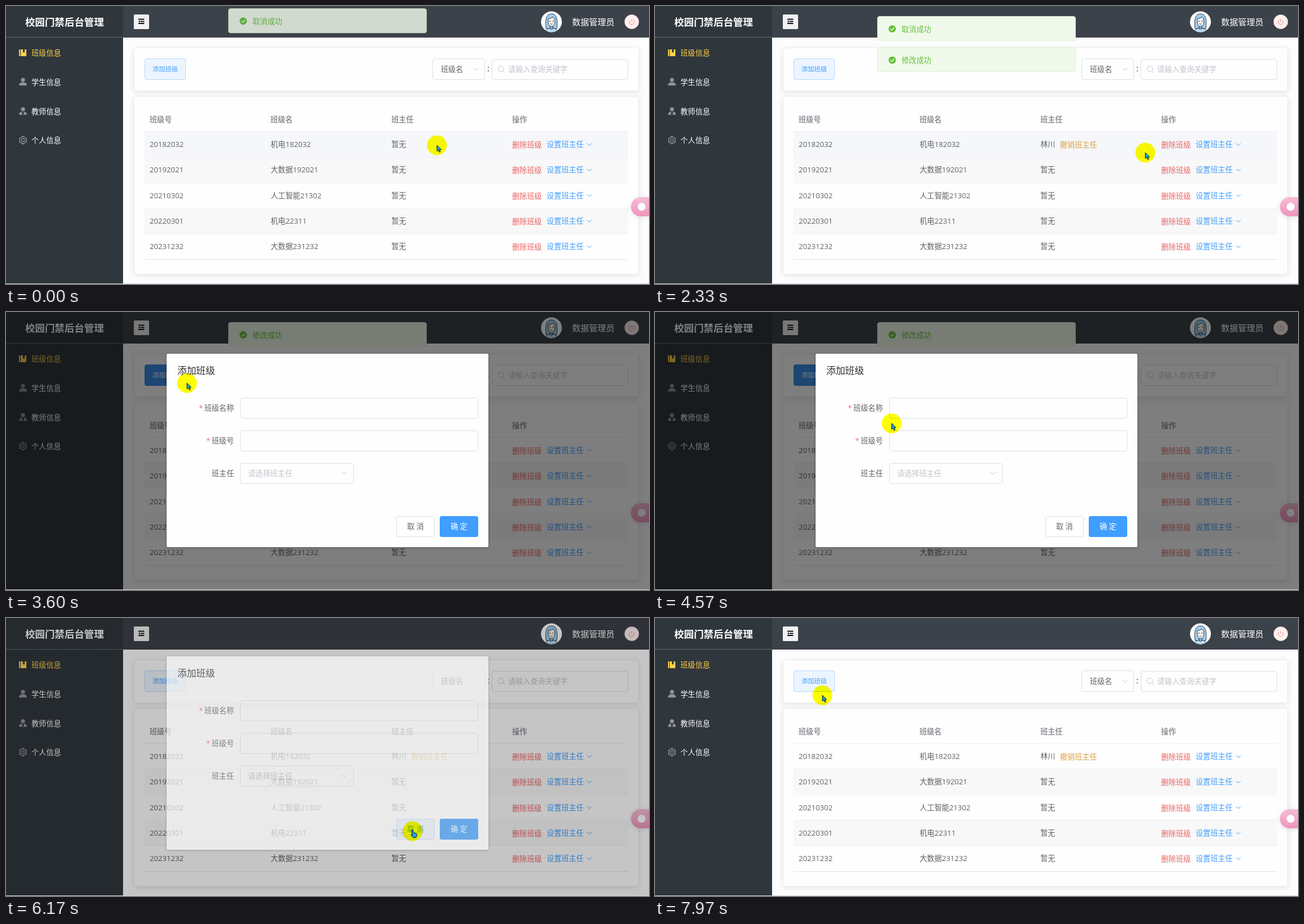
Animation of 1137 by 493 pixels, one loop 8 s. Source, as an HTML page:

```html
<!DOCTYPE html>
<html lang="zh-CN">
<head>
<meta charset="utf-8">
<title>班级信息</title>
<style>
html, body { margin: 0; width: 100%; height: 100%; overflow: hidden; background: #fdfdfd; }
svg { display: block; width: 1137px; height: 493px; }
text { font-family: "Open Sans", "Noto Sans CJK SC", "Noto Sans CJK", sans-serif; white-space: pre; }
.card { filter: drop-shadow(0 2px 5px rgba(0,0,0,.1)); }
.box { filter: drop-shadow(0 1px 2px rgba(0,0,0,.3)); }
.mid { text-anchor: middle; }
.end { text-anchor: end; }
.bold { font-weight: 700; }
.halo { mix-blend-mode: multiply; }
</style>
</head>
<body>
<svg id="stage" viewBox="0 0 1137 493"></svg>
<script>
const BLUE = '#409eff', RED = '#e96464', GREEN = '#67c23a', INK = '#606266', PALE = '#c0c4cc', EDGE = '#dcdfe6';
const ROW_TOP = 223, ROW_H = 45.3;

const rect = (x, y, w, h, fill, more = '') =>
  `<rect x="${x}" y="${y}" width="${w}" height="${h}" fill="${fill}" ${more}/>`;
const frame = (x, y, w, h, fill, edge, more = '') =>
  rect(x + .5, y + .5, w - 1, h - 1, fill, `stroke="${edge}" rx="3.5" ${more}`);
const text = (x, mid, str, fill = INK, size = 13.1, more = '') =>
  `<text x="${x}" y="${mid + size * .385}" font-size="${size}" fill="${fill}" ${more}>${str}</text>`;
const line = (d, color, width = 1, more = '') =>
  `<path d="${d}" fill="none" stroke="${color}" stroke-width="${width}" ${more}/>`;
const shape = (d, fill, more = '') => `<path d="${d}" fill="${fill}" ${more}/>`;
const disc = (x, y, r, fill, more = '') => `<circle cx="${x}" cy="${y}" r="${r}" fill="${fill}" ${more}/>`;
const chevron = (x, y, w, color) => line(`M${x - w} ${y - w / 2}l${w} ${w}l${w} ${-w}`, color);
const group = (id, body, more = '') => `<g id="${id}" ${more}>${body}</g>`;

function sidebar() {
  const person = y => disc(30, y - 4, 3.6, '#909399') + shape(`M23 ${y + 6}q0-6 7-6t7 6z`, '#909399');
  const teeth = [...Array(6)].map((_, i) => `rotate(${i * 60} 30 238)`)
    .map(r => line('M27.4 232.6L30 231l2.6 1.6', '#909399', 1.2, `transform="${r}"`)).join('');
  return rect(0, 0, 207, 492, '#2f363c') +
    line('M0 55.5H207', '#6d8f92', 1, 'stroke-dasharray="2 1"') +
    text(103.5, 28, '校园门禁后台管理', '#fff', 17.4, 'class="mid bold"') +
    shape('M23 77h2v12h-2zM26 77h4v6l1.5-1.5L33 83v-6h3v12H26z', '#ffd04b') +
    person(135) + person(187) + shape('M29 187h2l1 4-2 2-2-2z', '#2f363c') +
    teeth + disc(30, 238, 2.6, 'none', 'stroke="#909399" stroke-width="1.2"') +
    disc(30, 238, 5.6, 'none', 'stroke="#909399"') +
    ['班级信息', '学生信息', '教师信息', '个人信息']
      .map((s, i) => text(45, 83 + i * 51.8, s, i ? '#fff' : '#ffd04b')).join('');
}

function avatar() {
  const pen = 'stroke="#2c3b52" stroke-width="1"';
  return `<clipPath id="round">${disc(964.5, 28, 18.5, '#fff')}</clipPath>` + disc(964.5, 28, 18.5, '#fff') +
    `<g clip-path="url(#round)">` +
    shape('M955 40C953 24 955 14 964.5 14S976 24 974 40z', '#9fcdea', pen) +
    shape('M953 48q1-9 11.5-9t11.5 9z', '#b9dcf2', pen) +
    shape('M959 22q5 1 7-3 2 3 4.5 3.5V30q-1 6-6 6t-5.5-6z', '#fff3ea', pen) +
    disc(962, 27, .9, '#2c3b52') + disc(967.5, 27, .9, '#2c3b52') +
    line('M962.5 31.5q2 1.8 4 0', '#2c3b52') + line('M962 36v4l2.5 2 2.5-2v-4', '#2c3b52') + '</g>';
}

function header() {
  return rect(207, 0, 930, 56, '#3c4249') +
    rect(226, 15, 27, 26, '#f1f0f2', 'rx="1.5"') +
    line('M234 23.5h10.500M238 27.500h6.500M234 31h10.500', '#111', 1.8) + shape('M234 27.500l3-2v4z', '#111') +
    avatar() + text(1001, 28, '数据管理员', '#fff', 15) +
    disc(1106.5, 28, 12.5, '#fef0f0', 'stroke="#fbd0d0" stroke-width=".8"') +
    line('M1103.700 24.800a4.500 4.500 0 1 0 5.600 0M1106.500 23v5', '#f58a8a');
}

function filters() {
  return frame(226, 74, 893, 77, '#fefefe', '#ebeef5', 'class="card"') +
    frame(245, 93, 73, 38, '#ecf5ff', '#b3d8ff', 'id="add"') +
    text(281.5, 112, '添加班级', BLUE, 11.3, 'id="addText" class="mid"') +
    frame(754, 93, 93, 38, '#fefefe', EDGE) + text(769, 112, '班级名') + chevron(831, 112, 4.5, PALE) +
    text(851, 111, ':', '#222', 14) +
    frame(859, 94, 241, 37, '#fefefe', EDGE) +
    disc(875, 111.5, 5, 'none', `stroke="${PALE}"`) + line('M878.500 115l3 3', PALE) +
    text(888, 112, '请输入查询关键字', PALE);
}

function table() {
  const rows = [['20182032', '机电182032'], ['20192021', '大数据192021'], ['20210302', '人工智能21302'],
    ['20220301', '机电22311'], ['20231232', '大数据231232']];
  let out = frame(226, 160, 893, 316, '#fefefe', '#ebeef5', 'class="card"');
  ['班级号', '班级名', '班主任', '操作'].forEach((s, i) =>
    out += text(254 + i * 213.7, 200.5, s, '#909399', 13.1, 'class="bold"'));
  out += rect(245, 222, 855, 1, '#ebeef5');
  rows.forEach(([no, name], i) => {
    const y = 245 + i * ROW_H, top = ROW_TOP + i * ROW_H;
    out += rect(245, top, 855, ROW_H, '#fefefe', 'class="row"') +
      rect(245, Math.round(top + ROW_H - 1), 855, 1, i == 4 ? '#dfe2f0' : '#ebeef5') +
      text(254, y, no) + text(468, y, name) + text(681.5, y, '暂无', INK, 13.1, i ? '' : 'id="nobody"') +
      text(895, y + 1, '删除班级', RED) + text(956, y, '设置班主任', BLUE) + chevron(1031.5, y + .5, 4, BLUE);
  });
  return out + group('teacher', text(681.5, 245, '林川') + text(716, 246, '撤销班主任', '#dca046'));
}

function menu() {
  return frame(946, 262, 90, 220, '#fff', '#ebeef5', 'class="card"') +
    rect(947, 271.5, 88, 33.5, '#ecf5ff', 'id="pick"') +
    ['林川', '方宁', '苏禾', '许舟', '叶青', '何山'].map((s, i) => text(965, 288 + i * 33.5, s)).join('');
}

const toast = s => frame(393, 0, 351, 44, '#f0f9eb', '#e1f3d8') + disc(419.5, 22.5, 6.5, GREEN) +
  line('M416.500 22.700l2.200 2.200 4-4.400', '#fff', 1.300) + text(436, 22.5, s, GREEN);

function dialog() {
  const label = (y, s, star) => text(403, y, s, INK, 13.1, 'class="end"') +
    (star ? text(star, y, '*', '#f56c6c') : '');
  return rect(284, 74, 569, 343, '#fefefe', 'rx="2" class="box"') + text(303, 104, '添加班级', '#303133', 16.7) +
    label(170, '班级名称', 341) + frame(414, 152, 421, 37, '#fefefe', EDGE) +
    label(228, '班级号', 354) + frame(414, 210, 421, 37, '#fefefe', EDGE) +
    label(286, '班主任') + frame(414, 268, 201, 37, '#fefefe', EDGE) +
    text(428, 286, '请选择班主任', PALE) + chevron(598, 286, 4.5, PALE) +
    frame(690, 362, 68, 37, '#fff', EDGE, 'id="cancel"') + text(724, 380, '取 消', INK, 13.1, 'id="cancelText" class="mid"') +
    rect(767, 362, 68, 37, BLUE, 'rx="3.5"') + text(801, 380, '确 定', '#fff', 13.1, 'class="mid" font-weight="500"');
}

const pen = 'stroke="#0b1626" stroke-width="1" stroke-linejoin="round"';
const pointer =
  shape('M0 0v10.500l2.500-2.200 1.800 4 1.800-.8-1.800-3.800H7.500z', '#1aa5e6', 'id="arrow" ' + pen) +
  shape('M-2-2q1.500-1.500 2.500 0l1 4.500 5 1.500q1.500 1 .8 4L6 11.500H1L-3 7q0-2 2.500-.5z', '#1aa5e6', 'id="hand" ' + pen);

const stage = document.getElementById('stage');
stage.innerHTML = rect(0, 0, 1137, 493, '#fdfdfd') + filters() + table() + header() + sidebar() +
  group('menu', menu()) + group('toastA', toast('取消成功')) + group('toastB', toast('修改成功')) +
  `<linearGradient id="pink" x2="0" y2="1"><stop stop-color="#f6bdd4"/><stop offset="1" stop-color="#f094bd"/></linearGradient>` +
  shape('M1137 339h-15a17 17 0 0 0 0 34h15z', 'url(#pink)', 'class="card"') + disc(1124, 356, 7, '#fff') +
  rect(0, 0, 1137, 493, '#000', 'id="shade"') + group('dialog', dialog()) +
  rect(0, 492, 1137, 1, '#d9d6de') +
  disc(0, 0, 17.5, '#ff0', 'id="halo" class="halo"') + group('pointer', pointer);

const ui = {};
stage.querySelectorAll('[id]').forEach(el => ui[el.id] = el);
const rowEls = [...stage.querySelectorAll('.row')];

// time, x, y of the mouse
const PATH = [[0, 762, 247], [220, 762, 247], [770, 990, 248], [1020, 990, 248], [1600, 985, 286], [2020, 985, 286],
  [2320, 867, 260], [2600, 867, 260], [3240, 306, 116], [3340, 306, 116], [3580, 320, 126], [3640, 320, 126],
  [4130, 406, 190], [4470, 406, 190], [5260, 719, 378], [7030, 719, 378], [7830, 303, 143], [7900, 293, 132],
  [7970, 296, 137], [8000, 296, 137]];
const SET = 2050, OPEN = 3310, CLOSE = 6107;

const clamp = v => Math.max(0, Math.min(1, v));
function bezier(x1, y1, x2, y2) {
  const at = (a, b, s) => 3 * a * s * (1 - s) ** 2 + 3 * b * s * s * (1 - s) + s ** 3;
  return v => {
    if (v <= 0 || v >= 1) return clamp(v);
    let lo = 0, hi = 1;
    for (let i = 0; i < 22; i++) {
      const m = (lo + hi) / 2;
      if (at(x1, x2, m) < v) lo = m; else hi = m;
    }
    return at(y1, y2, lo);
  };
}
const ease = bezier(.25, .1, .25, 1), zoom = bezier(.23, 1, .32, 1);
const span = (t, from, to, ms, fn = ease) => fn((t - from) / ms) - fn((t - to) / ms);

function mouse(t) {
  const i = Math.max(1, PATH.findIndex(p => p[0] > t));
  const [a, x, y] = PATH[i - 1], [b, u, v] = PATH[i];
  const k = .5 - Math.cos(Math.PI * clamp((t - a) / (b - a))) / 2;
  return [x + (u - x) * k, y + (v - y) * k];
}
const inside = (x, y, l, t, r, b) => x >= l && x <= r && y >= t && y <= b;
const show = (el, on) => el.setAttribute('visibility', on ? 'visible' : 'hidden');
const paint = (el, fill, edge) => {
  el.setAttribute('fill', fill);
  if (edge) el.setAttribute('stroke', edge);
};

function moveToast(el, t, start, end, top) {
  el.setAttribute('opacity', span(t, start, end, 300));
  el.setAttribute('transform', `translate(0 ${top - 44 * (1 - span(t, start, end, 400))})`);
}

function draw(t) {
  const [x, y] = mouse(t);
  const modal = t >= OPEN && t < CLOSE + 200, list = t >= 950 && t < 1990;

  moveToast(ui.toastA, t, -160, 2840, 18);
  moveToast(ui.toastB, t, SET, 5050, 76 - 58 * ease((t - 2840) / 400));

  show(ui.nobody, t < SET);
  show(ui.teacher, t >= SET);
  const hovered = modal || (list && y > 262) || x < 245 || x > 1100 ? -1 : Math.floor((y - ROW_TOP) / ROW_H);
  rowEls.forEach((el, i) => paint(el, i == hovered ? '#f5f7fa' : i % 2 ? '#f8f8f8' : '#fefefe'));

  const lit = (t >= OPEN && t < CLOSE) || (!modal && inside(x, y, 245, 93, 318, 131));
  paint(ui.add, lit ? '#3a8ee6' : '#ecf5ff', lit ? '#3a8ee6' : '#b3d8ff');
  paint(ui.addText, lit ? '#fff' : BLUE);

  const drop = span(t, 950, 1990, 300, zoom);
  ui.menu.setAttribute('opacity', drop);
  ui.menu.setAttribute('transform', `translate(0 ${262 * (1 - drop)}) scale(1 ${drop})`);
  show(ui.pick, y > 272);

  ui.shade.setAttribute('opacity', span(t, OPEN, CLOSE, 200) / 2);
  const open = span(t, OPEN, CLOSE, 300);
  ui.dialog.setAttribute('opacity', open);
  ui.dialog.setAttribute('transform', `translate(0 ${-18.6 * (1 - open)})`);
  const over = inside(x, y, 690, 358, 758, 399);
  paint(ui.cancel, over ? '#ecf5ff' : '#fff', over ? '#c6e2ff' : EDGE);
  paint(ui.cancelText, over ? BLUE : INK);

  const at = `translate(${x} ${y})`;
  ui.halo.setAttribute('transform', at);
  ui.pointer.setAttribute('transform', at);
  const hand = (modal && over) || (t < 2040 && x > 956);
  show(ui.hand, hand);
  show(ui.arrow, !hand);
}

const begin = performance.now();
function tick() {
  draw((performance.now() - begin) % 8000);
  requestAnimationFrame(tick);
}
draw(0);
requestAnimationFrame(tick);
</script>
</body>
</html>
```
